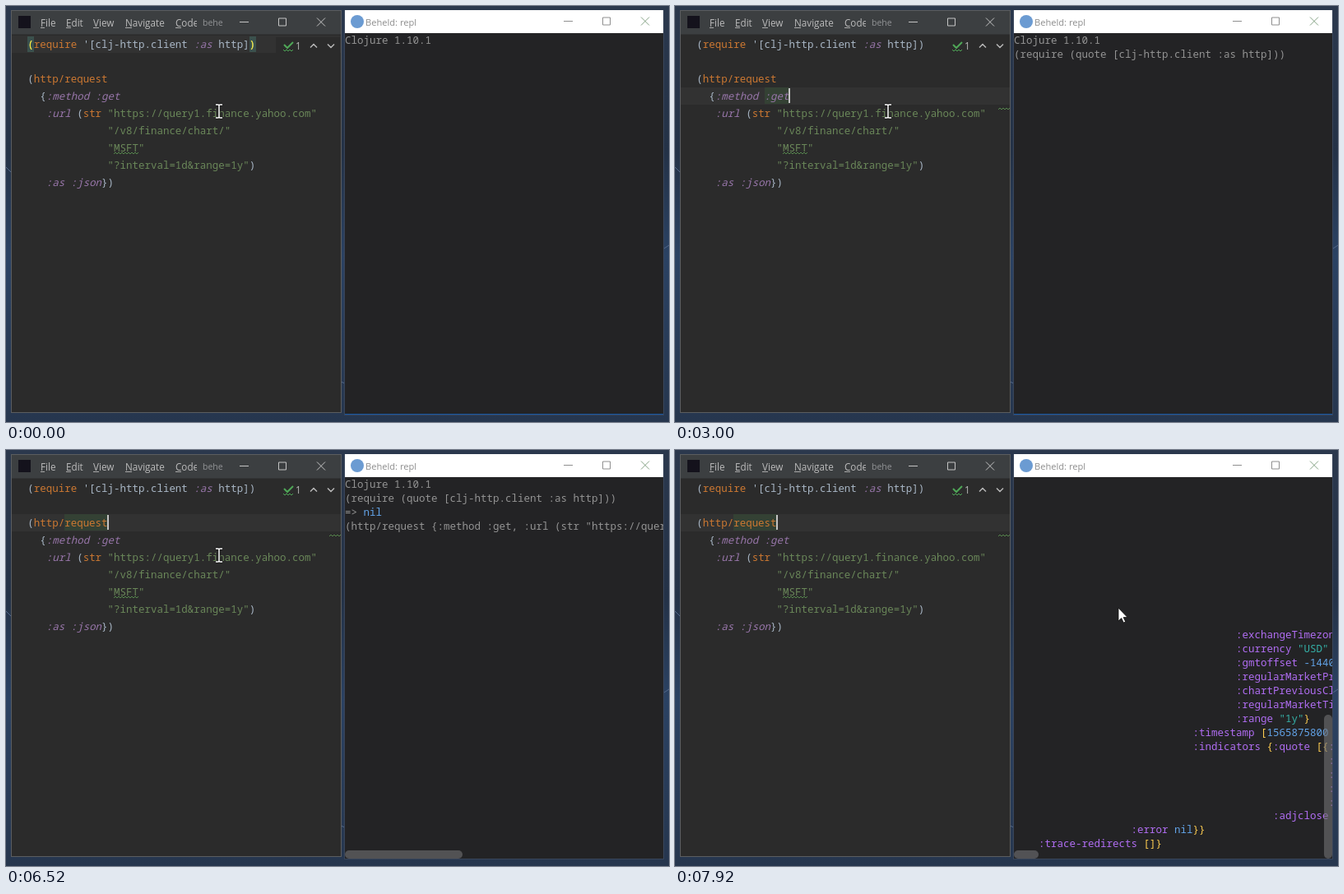
An HTML page for the animation above (8 s loop, 806 by 506 pixels).

```html
<!DOCTYPE html>
<html lang="en">
<head>
<meta charset="utf-8">
<title>Editor and REPL</title>
<style>
  html, body { margin: 0; width: 100%; height: 100%; overflow: hidden; background: #27364c; }
  svg { display: block; width: 806px; height: 506px; }
  text { white-space: pre; }
  .code { font: 12.47px "Noto Sans Mono", "DejaVu Sans Mono", monospace; fill: #a9b7c6; }
  .code .fn { fill: #cc7832; }
  .code .key { fill: #9876aa; font-style: italic; }
  .code .str { fill: #6a8759; }
  .repl { font: 12.5px "Noto Sans Mono", "DejaVu Sans Mono", monospace; fill: #939393; }
  .repl .key { fill: #b06df2; }
  .repl .str { fill: #35b0a7; }
  .repl .num { fill: #62a3e8; }
  .repl .pair { fill: #ffce51; }
  .ui { font: 11.7px "Open Sans", "Noto Sans", sans-serif; fill: #bbb; }
  .line { fill: none; stroke-width: 1; }
</style>
</head>
<body>
<svg id="stage" viewBox="0 0 806 506"></svg>
<script>
const LOOP = 8000;
const stage = document.getElementById('stage');
const escape = s => s.replace(/&/g, '&amp;').replace(/</g, '&lt;').replace(/>/g, '&gt;');
const rect = (x, y, w, h, fill, extra = '') =>
  `<rect x="${x}" y="${y}" width="${w}" height="${h}" fill="${fill}" ${extra}/>`;
const path = (d, stroke, extra = '') => `<path class="line" d="${d}" stroke="${stroke}" ${extra}/>`;
const text = (x, y, cls, body, extra = '') => `<text x="${x}" y="${y}" class="${cls}" ${extra}>${body}</text>`;

// Pairs of start and end times during which the content shows
const during = (times, body) => `<g data-on="${times}">${body}</g>`;

// Wraps each match in a tspan named after the group that matched
const colour = (s, rule) => s.split(rule.split).filter(Boolean).map(part => {
  const kind = Object.keys(rule.kinds).find(k => rule.kinds[k].test(part));
  return kind ? `<tspan class="${kind}">${escape(part)}</tspan>` : escape(part);
}).join('');

const codeRule = {
  split: /("[^"]*"|:\w+|require|http\/request|str\b)/,
  kinds: { str: /^"/, key: /^:/, fn: /^(require|http\/request|str)$/ }
};
const dataRule = {
  split: /("[^"]*"|:[\w-]*|-?\d+|nil|[[\]{}])/,
  kinds: { str: /^"/, key: /^:/, num: /^(-?\d+|nil)$/, pair: /^[[\]{}]$/ }
};

const code = [
  "(require '[clj-http.client :as http])",
  '',
  '(http/request',
  '  {:method :get',
  '   :url (str "https://query1.finance.yahoo.com"',
  '             "/v8/finance/chart/"',
  '             "MSFT"',
  '             "?interval=1d&range=1y")',
  '   :as :json})'
];

// Column and text of each visible line of the response
const response = [
  [36, ':exchangeTimezoneName'], [36, ':currency "USD"'], [36, ':gmtoffset -14400'],
  [36, ':regularMarketPrice'], [36, ':chartPreviousClose'], [36, ':regularMarketTime'],
  [36, ':range "1y"}'], [29, ':timestamp [1565875800'], [29, ':indicators {:quote [{:'],
  [51, ':'], [51, ':'], [51, ':'], [51, ':'], [42, ':adjclose ['],
  [19, ':error nil}}'], [4, ':trace-redirects []}']
];

const rowTop = row => 36 + 21 * row;
const rowBar = (row, times) => during(times, rect(7, rowTop(row), 400, 21, '#323232'));
const caret = (row, x, times) => during(times, rect(x, rowTop(row) + 1, 2, 18, '#c4c4c4'));
const wave = (x, y, w) => {
  let d = `M${x} ${y}`;
  for (let i = 2; i <= w; i += 2) d += `L${x + i} ${y + (i % 4 ? -2 : 0)}`;
  return path(d, '#56884d');
};
const buttons = (x, y, ink, last = ink) =>
  path(`M${x} ${y}h11M${x + 47.5} ${y - 4.5}h9v9h-9z`, ink) +
  path(`M${x + 94} ${y - 5}l10 10m0 -10l-10 10`, last);
const repl = (row, body) => text(412, 46 + 17 * row, 'repl', body);
const thumb = (x, y, w, h) => rect(x, y, w, h, '#707072', 'rx="5" opacity=".62"');

function desktop() {
  return `<defs>
    <linearGradient id="sky" x2="0" y2="1">
      <stop stop-color="#2b384d"/><stop offset=".35" stop-color="#243247"/>
      <stop offset=".6" stop-color="#2b4263"/><stop offset="1" stop-color="#26364e"/>
    </linearGradient>
    <clipPath id="pane"><rect x="412" y="33" width="387" height="464"/></clipPath>
  </defs>` + rect(0, 0, 806, 506, 'url(#sky)') +
  path('M0 196l6 6M800 295l6 -4M407 457l5 2', '#54698a');
}

function editor() {
  const menu = [[42, 'File', 5], [73, 'Edit', 6], [106, 'View', 7], [145, 'Navigate', 8], [206, 'Code', 7]];
  return rect(6, 5, 402, 490, '#5b5d5f') + rect(7, 6, 400, 488, '#2b2b2b') +
    rect(7, 6, 400, 28, '#3c3f41') + rect(7, 34, 400, 1, '#323435') +
    rect(15, 12, 15, 15, '#14121c') +
    menu.map(([x, word, w]) => text(x, 24.5, 'ui', word) + path(`M${x} 26.5h${w}`, '#aaa')).join('') +
    rect(232, 8, 40, 24, '#3c3f41') +
    text(239, 24, 'ui', 'behel', 'style="font-size:10.5px;fill:#929496"') +
    rect(264, 8, 14, 24, '#3c3f41') +
    buttons(284, 19.5, '#c4c4c4') +
    rowBar(0, '0 1520') + rowBar(1, '1520 1800') + rowBar(2, '1800 1920 4200 8000') + rowBar(3, '1920 4200') +
    rect(328, 38, 78, 20, '#2b2b2b') +
    path('M338 47l4 4l7 -7', '#4fa657', 'style="stroke-width:2"') +
    path('M337 53l2 2l2 -2l2 2l2 -2l2 2l2 -2', '#4fa657') +
    text(352, 53, 'ui', '1') +
    path('M370 50.5l4 -4l4 4M391 46.5l4 4l4 -4', '#b8b8b8', 'style="stroke-width:1.5"') +
    during('0 1520', rect(26, 37, 8, 19, '#3b514d') + rect(296, 37, 8, 19, '#3b514d')) +
    during('2240 4480', rect(109, 99, 30, 20, '#344134') + wave(393, 126, 14)) +
    during('4480 8000', rect(71, 78, 53, 20, '#344134') + wave(393, 105, 14)) +
    code.map((s, i) => text(26.3, 50.5 + 21 * i, 'code', colour(s, codeRule))).join('') +
    during('0 1520', text(26.3, 50.5, 'code', '(', 'style="fill:#ffef28"') +
      text(295.6, 50.5, 'code', ')', 'style="fill:#ffef28"')) +
    wave(131, 180, 30) +
    during('5080 5840', '<circle cx="40" cy="67.5" r="5.3" fill="#f0a732"/>' +
      rect(37, 70, 6, 3, '#f0a732') + rect(37.5, 74, 5, 2, '#aaa')) +
    caret(0, 26, '80 520 1080 1520') + caret(1, 26, '1520 1800') + caret(2, 26, '1800 1920') +
    caret(3, 138, '1920 2240 3000 3560 4040 4200') +
    caret(2, 123, '4200 5000 5520 6080 6520 7080 7560 8000');
}

function viewer() {
  const request = '(http/request {:method :get, :url (str "https://query1.finance.yahoo.com"';
  return rect(411, 5, 389, 493, '#39455a') + rect(412, 33, 387, 464, '#232325') +
    rect(412, 5, 387, 28, '#fff') +
    '<circle cx="427" cy="19" r="8" fill="#6b9bd2"/>' +
    text(437, 23.5, 'ui', 'Beheld: repl', 'style="font-size:11.1px;fill:#8d8d8d"') +
    buttons(678, 18.5, '#8f8f8f', '#84a284') +
    '<g clip-path="url(#pane)">' +
    during('0 6600', repl(0, 'Clojure 1.10.1')) +
    during('1080 6600', repl(1, '(require (quote [clj-http.client :as http]))')) +
    during('5000 6600', repl(2, '=&gt; <tspan class="num">nil</tspan>')) +
    during('5840 6600', repl(3, request) + thumb(412, 487, 143, 10)) +
    during('6600 8000', response.map(([col, s], i) =>
      text(412 + 7.5 * col, 229 + 16.96 * i, 'repl', colour(s, dataRule))).join('') +
      thumb(412, 487, 30, 10) + thumb(789, 322, 10, 175)) +
    during('0 5840', rect(412, 496, 387, 1, '#1557a5')) + '</g>';
}

function pointers() {
  const beam = 'M-4 -8h3l1 1l1 -1h3M0 -7v14M-4 8h3l1 -1l1 1h3';
  return `<g id="beam">${path(beam, '#111', 'style="stroke-width:3"')}${path(beam, '#fff', 'style="stroke-width:1.5"')}</g>
    <path id="arrow" d="M0 0V16L3.7 12.6L6.3 18L8.7 17L6.2 11.6H11Z" fill="#fff" stroke="#111" stroke-width=".8"/>`;
}

stage.innerHTML = desktop() + editor() + viewer() + pointers();
const timed = [...stage.querySelectorAll('[data-on]')].map(node => ({ node, times: node.dataset.on.split(' ').map(Number) }));
const beam = document.getElementById('beam');
const arrow = document.getElementById('arrow');

function draw(t) {
  for (const { node, times } of timed) {
    // An odd number of passed boundaries means the part is on
    const on = times.filter(time => time <= t).length % 2;
    node.style.display = on ? '' : 'none';
  }
  const p = Math.min(1, Math.max(0, (t - 7600) / 320));
  const ease = p * p * (3 - 2 * p);
  const x = 259 + 280 * ease, y = 128 + 64 * ease;
  for (const shape of [beam, arrow]) shape.setAttribute('transform', `translate(${x} ${y})`);
  beam.style.display = x < 407 ? '' : 'none';
  arrow.style.display = x < 407 ? 'none' : '';
}

const start = performance.now();
function tick() {
  draw((performance.now() - start) % LOOP);
  requestAnimationFrame(tick);
}
tick();
</script>
</body>
</html>
```
